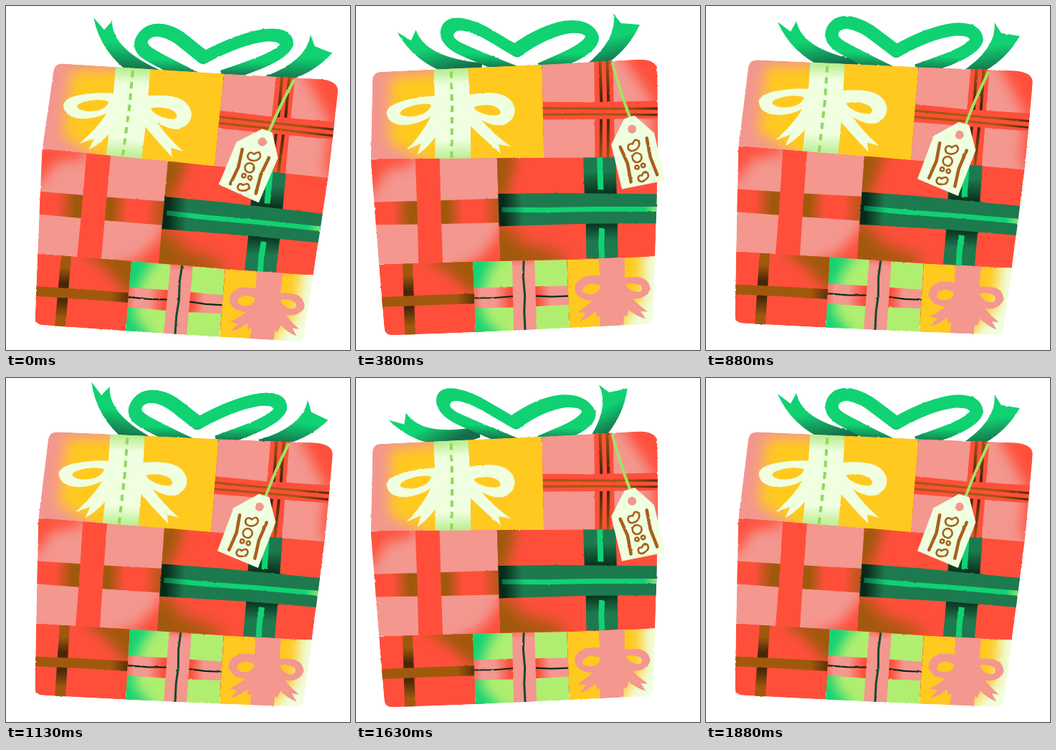
An HTML page for the animation above (2010 ms loop, 480 px wide and 480 px high).

```html
<!DOCTYPE html>
<html lang="en">
<head>
<meta charset="utf-8">
<title>Swaying gifts</title>
<style>
html, body { margin: 0; width: 100%; height: 100%; overflow: hidden; background: #fff; }
svg { display: block; width: 100vw; height: 100vh; }
</style>
</head>
<body>
<svg viewBox="0 0 480 480">
  <defs id="defs">
    <filter id="rough" filterUnits="userSpaceOnUse" x="0" y="0" width="480" height="480" color-interpolation-filters="sRGB">
      <feTurbulence type="fractalNoise" baseFrequency=".16" numOctaves="2" seed="4"/>
      <feDisplacementMap in="SourceGraphic" scale="2" xChannelSelector="R" yChannelSelector="G"/>
    </filter>
    <radialGradient id="lime" gradientUnits="userSpaceOnUse" cx="360" cy="25" r="46">
      <stop offset=".25" stop-color="#9be263"/><stop offset="1" stop-color="#9be263" stop-opacity="0"/>
    </radialGradient>
    <linearGradient id="tailShade" x2="0" y2="1">
      <stop offset=".4" stop-color="#10d272"/><stop offset=".85" stop-color="#17694a"/>
    </linearGradient>
    <linearGradient id="loopShade" x2="0" y2="1">
      <stop offset=".62" stop-color="#10d272"/><stop offset=".95" stop-color="#17694a"/>
    </linearGradient>
  </defs>
  <g filter="url(#rough)">
    <g id="stack">
      <g fill="url(#tailShade)">
        <path id="tailL" d="M91,8L107,24L117,11Q120,52 196,78L190,92L150,84Q104,56 91,8Z"/>
        <path id="tailR" d="M426,36L401,28L394,12Q392,50 334,76L338,92L364,92L372,77Q404,64 426,36Z"/>
      </g>
      <g id="bow" fill="none" stroke-width="18" stroke-linejoin="round">
        <path id="loop" stroke="url(#loopShade)" d="M240,84Q198,66 172,53Q150,42 156,28Q162,15 180,17Q198,20 214,32L246,54Q290,26 325,20Q354,17 357,33Q354,48 310,66L276,80"/>
        <use id="glint" href="#loop" style="stroke:url(#lime)"/>
      </g>
      <g id="box"><path fill="#ff4f3b" d="M52,85L428,86L424,205L414,350L406,436L50,436L44,345L42,200Z"/></g>
    </g>
    <g id="pendant">
      <path fill="none" stroke="#a3e265" stroke-width="4" stroke-linecap="round" d="M1,1Q-3,40 -3,81"/>
      <g id="tag" fill="none" stroke="#a85f1d" stroke-width="2.6" stroke-linejoin="round" stroke-linecap="round">
        <path fill="#efffdf" fill-rule="evenodd" stroke="none" d="M-6,-17L9,-17L28,14L23,82L-38,76L-34,12ZM-6,0a6,6 0 1 0 12,0a6,6 0 1 0 -12,0Z"/>
        <path stroke-width="4.5" d="M-23,19L-20,44L-23,70M16,18L13,45L15,71"/>
        <path d="M-13,24Q-12,17 -5,20Q0,12 4,19Q5,26 -3,29Q-12,31 -13,24Z"/>
        <circle cx="-5" cy="40" r="6.5"/>
        <circle cx="-9" cy="53" r="2.6"/>
        <circle cx="0" cy="53" r="2.6"/>
        <path d="M-12,71Q-12,63 -6,66Q0,59 3,65Q4,71 -3,73Q-9,76 -12,71Z"/>
      </g>
    </g>
  </g>
</svg>
<script>
const RED = '#ff4f3b', PINK = '#f3978f', GOLD = '#ffc91f', CREAM = '#efffdf', BROWN = '#a0590c',
      GREEN = '#10d272', PINE = '#1d7a4e', LEAF = '#b0ee70', LIME = '#a9e878', INK = '#062a1a', UMBER = '#4a2608';
const $ = id => document.getElementById(id);

function el(parent, name, attrs) {
  const e = document.createElementNS('http://www.w3.org/2000/svg', name);
  for (const k in attrs) e.setAttribute(k, attrs[k]);
  return parent.appendChild(e);
}

// Gradient along x or y: "offset colour, offset colour ..."
let uid = 0;
function grad(axis, stops) {
  const id = 'g' + uid++;
  const g = el($('defs'), 'linearGradient', axis === 'x' ? { id } : { id, x2: 0, y2: 1 });
  stops.split(',').forEach(s => {
    const [offset, color] = s.trim().split(' ');
    el(g, 'stop', { offset, 'stop-color': color });
  });
  return `url(#${id})`;
}
[9, 12].forEach(n => {
  const f = el($('defs'), 'filter', { id: 'blur' + n, filterUnits: 'userSpaceOnUse', x: -60, y: -60, width: 600, height: 600, 'color-interpolation-filters': 'sRGB' });
  el(f, 'feGaussianBlur', { stdDeviation: n });
});

const fill = (c, d) => ({ d, fill: c, 'fill-rule': 'evenodd' });
const glow = (c, n, d) => ({ d, fill: c, filter: `url(#blur${n})` });
const line = (c, w, d, dash = 'none') => ({ d, fill: 'none', stroke: c, 'stroke-width': w, 'stroke-dasharray': dash });

function gift(color, outline, ...parts) {
  const id = 'clip' + uid++;
  el(el($('defs'), 'clipPath', { id }), 'path', { d: outline });
  const g = el($('box'), 'g', { 'clip-path': `url(#${id})` });
  [fill(color, outline), ...parts].forEach(p => el(g, 'path', p));
}

// Top row
gift(PINK, 'M33,197L41,86Q42,75 54,75L278,75L274,206Z',
  glow(GOLD, 9, 'M66,84L130,80L200,50L320,50L320,235L125,212L60,176Z'),
  fill(grad('y', `0 ${LIME},.2 ${CREAM},.75 ${CREAM},1 ${LIME}`), 'M127,70L175,70L175,140L172,210L122,210L126,140Z'),
  fill(CREAM, 'M150,118Q138,110 108,113Q60,118 58,133Q60,152 88,151Q106,149 119,141Q110,160 84,186L104,178L98,194Q120,180 135,155L150,150L170,152Q188,172 214,197L212,184L229,188Q204,168 190,149Q206,159 221,157Q238,150 237,134Q232,112 200,111Q172,111 150,118Z'
    + 'M121,125Q116,139 92,140Q77,139 77,133Q82,126 104,123Q118,122 121,125ZM180,130Q200,125 213,133Q220,139 214,143Q202,145 188,138Q181,134 180,130Z'),
  line('#8fd85b', 4, 'M151,79L150,130L145,208', '9 7'));
gift(PINK, 'M278,75L415,74Q438,76 438,90L433,213L274,206Z',
  glow(RED, 9, 'M385,60L460,60L460,225L428,205L430,135L410,100Z'),
  fill(RED, 'M351,70L377,70L373,215L345,215Z'),
  line(grad('y', `0 ${BROWN},.4 ${UMBER},.6 ${UMBER},1 ${BROWN}`), 4, 'M359,70L358,130L353,215M369,70L368,130L363,215'),
  fill(RED, 'M270,127L345,131L440,133L440,158L350,155L270,152Z'),
  line(grad('x', `0 ${BROWN},.7 ${BROWN},1 ${UMBER}`), 3.2, 'M272,136L350,140L440,144M272,145L350,148L440,153'));

// Middle row
gift(PINK, 'M33,197L209,203L206,348L37,345Z',
  glow(RED, 9, 'M20,185L100,188L90,207L52,214L38,240L20,255Z'),
  glow(RED, 9, 'M225,270L225,365L130,362L178,342L200,318Z'),
  fill(grad('x', `0 ${RED},.18 ${RED},.31 ${BROWN},.38 ${BROWN},.53 ${BROWN},.58 ${BROWN},.7 ${RED},.83 ${RED},1 ${BROWN}`), 'M25,257L120,259L215,260L215,294L120,292L25,289Z'),
  fill(RED, 'M95,195L129,195L127,280L126,350L92,350L94,280Z'));
gift(RED, 'M209,203L433,212L422,351L206,348Z',
  glow(BROWN, 9, 'M190,190L238,196L226,235L218,262L190,265Z'),
  glow(BROWN, 12, 'M185,290L220,300L240,326L290,340L300,365L185,365Z'),
  fill(grad('y', `0 ${PINE},.4 ${PINE},1 ${INK}`), 'M329,205L374,205L373,262L328,260Z'),
  fill(grad('y', `0 ${INK},.5 ${PINE},1 ${PINE}`), 'M328,298L372,300L370,355L326,355Z'),
  line(GREEN, 8, 'M352,205L351,254M350,308L348,330L348,356'),
  fill(grad('x', `0 ${INK},.06 ${INK},.17 ${PINE},1 ${PINE}`), 'M200,253L290,256L440,264L436,305L330,301L200,299Z'),
  line(grad('x', `0 #0d6b45,.15 ${GREEN},.9 ${GREEN},1 ${LIME}`), 7, 'M212,276L270,279L340,281L432,285'));

// Bottom row
gift(RED, 'M37,345L168,347L167,446L52,445Q40,445 40,434Z',
  glow(BROWN, 9, 'M95,335L185,335L185,400L160,388L138,364Z'),
  fill(grad('y', `0 ${BROWN},.2 ${BROWN},.4 ${UMBER},.62 ${UMBER},.85 ${BROWN},1 ${BROWN}`), 'M70,340L84,340L83,450L68,450Z'),
  fill(grad('x', `0 ${BROWN},.78 ${BROWN},1 ${UMBER}`), 'M30,391L100,391L175,392L175,406L100,405L30,405Z'));
gift(LEAF, 'M168,347L299,350L298,446L167,446Z',
  glow(GREEN, 9, 'M150,335L210,335L190,358L178,390L176,425L195,445L210,460L150,460Z'),
  fill(grad('x', `0 ${RED},.12 ${PINK},.25 ${PINK},.4 ${RED},.66 ${RED},.78 ${PINK},1 ${PINK}`), 'M160,384L235,385L305,387L305,413L235,414L160,412Z'),
  line(INK, 2.2, 'M167,398L195,399L222,398M253,399L275,401L299,401'),
  fill(grad('y', `0 ${RED},.15 ${PINK},1 ${PINK}`), 'M223,340L254,340L252,450L220,450Z'),
  line('#17492f', 3, 'M239,348L237,372L238,398L236,420L236,447'));
gift(GOLD, 'M299,350L422,351L414,436Q414,445 403,445L298,446Z',
  glow(CREAM, 9, 'M406,330L450,330L450,470L370,470L378,434L402,412Z'),
  fill(PINK, 'M343,340L380,340L377,400L373,450L340,450L344,400Z'),
  fill(PINK, 'M360,380Q340,371 322,375Q307,381 308,394Q312,408 332,409Q322,418 310,424L322,426L313,437Q328,432 335,424L337,432L360,424L378,434L382,424Q392,434 405,438L398,427L408,428Q394,417 388,409Q406,411 413,397Q413,383 398,379Q380,377 360,380Z'
    + 'M343,388Q344,398 331,400Q319,400 319,393Q321,387 332,385ZM379,388Q392,386 400,391Q404,397 397,400Q384,400 379,388Z'));

const wave = (k, lag) => Math.cos((k - lag) * Math.PI / 4);

// The stack shears over its floor; the bow, tails and tag each follow later.
function pose(k) {
  const s = wave(k, 0), g = wave(k, .5), b = 11 * g - 4;
  const flap = 16 * wave(k, 1) - 11, swing = Math.sin(s * Math.PI / 2);
  const move = (id, value) => $(id).setAttribute('transform', value);
  const lift = 18 * s * s - 15 * s;
  move('stack', `matrix(1 ${.063 * s} ${-.0705 * s} ${1 - .0135 * s * s} ${31.4 * s} ${lift})`);
  move('bow', `matrix(1 ${-.006 * b} ${-.02 * b} 1 ${1.5 * b} ${1.48 * b})`);
  move('tailL', `rotate(${flap} 150 78)`);
  move('tailR', `rotate(${flap} 365 78)`);
  $('glint').setAttribute('opacity', Math.max(0, Math.min(1, 1.1 * g)));
  move('pendant', `translate(${375 + 26 * s} ${76 + 23.6 * s + lift}) rotate(${23 * swing})`);
  move('tag', `translate(-6 97) rotate(${-4 * swing})`);
}

// Sixteen held poses per loop, two full sways
let shown = -1;
function update(now) {
  const t = now % 2010;
  const k = Math.min(15, Math.floor(Math.floor(t / 10) * 10 / 125)) % 8;
  if (k !== shown) pose(shown = k);
}
const start = performance.now();
function tick() {
  update(performance.now() - start);
  requestAnimationFrame(tick);
}
tick();
</script>
</body>
</html>
```
